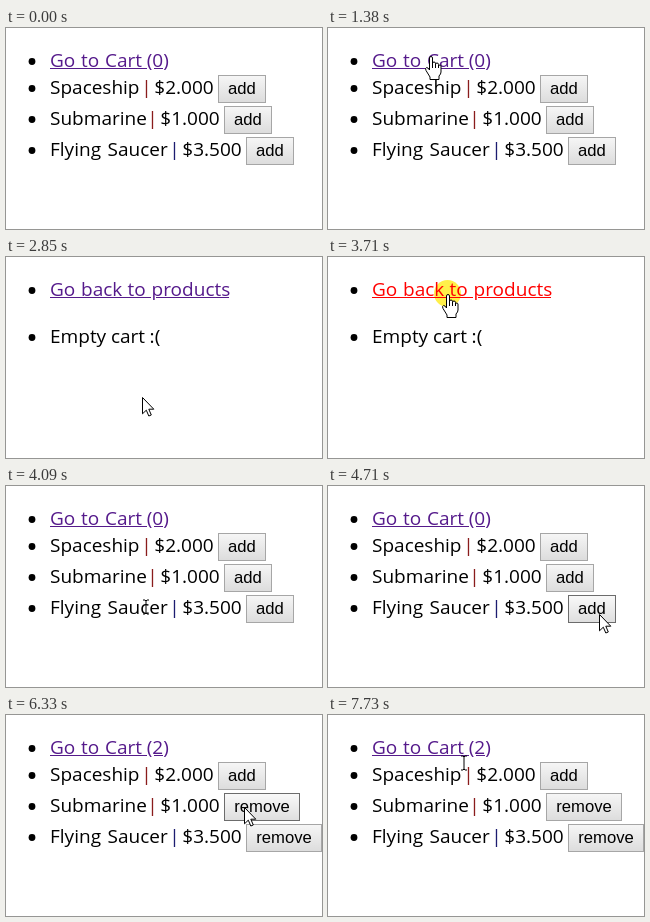
Write an HTML page that moves like this. It is 316 px wide and 201 px high and loops after 8 s.

```html
<!DOCTYPE html>
<html lang="en">
<head>
<meta charset="utf-8">
<title>Cart demo</title>
<style>
  html, body { margin: 0; width: 100%; height: 100%; overflow: hidden; background: #fff; }
  svg { display: block; width: 316px; height: 201px; }
  text { font: 19px "Open Sans", "Noto Sans", sans-serif; fill: #000; }
  .link text, .link rect { fill: #551a8b; }
  .link.active text, .link.active rect { fill: #f00; }
  .btn rect { fill: url(#face); stroke: #a6a6a6; }
  .btn text { font: 16.67px "Liberation Sans", Arial, sans-serif; text-anchor: middle; }
  .btn.hover rect { fill: url(#faceHover); stroke: #6c6c6c; }
  .btn.active rect { fill: url(#faceDown); }
  .bar { text-anchor: middle; }
  #halo { fill: #fff04a; mix-blend-mode: multiply; }
  .shape { fill: #fff; stroke: #000; stroke-linejoin: round; }
  .line { fill: none; stroke: #000; }
</style>
</head>
<body>
<svg viewBox="0 0 316 201">
  <defs>
    <linearGradient id="face" x2="0" y2="1"><stop stop-color="#f6f6f6"/><stop offset="1" stop-color="#dcdcdc"/></linearGradient>
    <linearGradient id="faceHover" x2="0" y2="1"><stop stop-color="#f9f9f9"/><stop offset="1" stop-color="#dedede"/></linearGradient>
    <linearGradient id="faceDown" x2="0" y2="1"><stop stop-color="#dcdcdc"/><stop offset="1" stop-color="#f3f3f3"/></linearGradient>
  </defs>
  <g id="shop"></g>
  <g id="cart"></g>
  <circle id="halo" r="13.5"/>
  <g id="cursor">
    <path id="arrow" class="shape" d="M.5 .5V16.8L4.3 13.2 6.8 19 9.3 18 6.8 12.2H11.8Z"/>
    <g id="hand">
      <path class="shape" d="M-1.5 14V2a1.5 1.5 0 0 1 3 0V8.5V7.5a1.5 1.5 0 0 1 3 0V9V8.5a1.5 1.5 0 0 1 3 0V10.5V10a1.3 1.3 0 0 1 2.5 0V16Q10 18 8 20V23.5H-1V21L-5 14.5Q-6.3 12 -4.3 11.5 -3 11.5 -1.5 14Z"/>
      <path class="line" d="M1.5 8V12M4.5 9V12M7.5 10V12"/>
    </g>
    <path id="beam" class="line" d="M-3 -7H-1L0 -6L1 -7H3M0 -6V6M-3 7H-1L0 6L1 7H3"/>
  </g>
</svg>
<script>
const LOOP = 8000;
const $ = id => document.getElementById(id);

function add(parent, tag, attrs, content = '') {
  const el = document.createElementNS('http://www.w3.org/2000/svg', tag);
  for (const k in attrs) el.setAttribute(k, attrs[k]);
  el.textContent = content;
  return parent.appendChild(el);
}

// words: [x, text, x, text, ...]
function line(parent, y, words) {
  const els = [];
  for (let i = 0; i < words.length; i += 2)
    els.push(add(parent, 'text', { x: words[i], y }, words[i + 1]));
  return els;
}

const bullet = (parent, cy) => add(parent, 'circle', { cx: 26, cy, r: 3.4 });

function link(parent, words, strokes) {
  bullet(parent, 33.5);
  const g = add(parent, 'g', { class: 'link' });
  const els = line(g, 39, words);
  for (const [a, b] of strokes) add(g, 'rect', { x: a, y: 40, width: b - a, height: 1 });
  return { g, els };
}

const shopLink = link($('shop'), [44, 'Go', 75, 'to', 98.9, 'Cart', 140.7, '(0)'], [[44, 141], [148, 157]]);
const cartLink = link($('cart'), [44, 'Go', 75, 'back', 121.6, 'to', 145.6, 'products'], [[44, 145], [150, 223]]);
bullet($('cart'), 80.5);
line($('cart'), 86, [44, 'Empty', 105, 'cart', 143.6, ':(']);

// words, price, button x, bar colour, time added
const rows = [
  [[44, 'Spaceship'], '$2.000', 212, '#8a1c1c', Infinity],
  [[44, 'Submarine'], '$1.000', 218, '#8a1c1c', 6330],
  [[44, 'Flying', 101.6, 'Saucer'], '$3.500', 240, '#1c1c70', 5330]
].map(([words, price, x, color, added], i) => {
  const shop = $('shop'), y = 47 + 31 * i, base = y + 19;
  bullet(shop, y + 13.5);
  line(shop, base, [...words, x - 63.7, price]);
  add(shop, 'text', { x: x - 71.5, y: base, class: 'bar', style: `fill:${color}` }, '|');
  const g = add(shop, 'g', { class: 'btn' });
  const box = add(g, 'rect', { x: x + .5, y: y + .5, height: 27 });
  const label = add(g, 'text', { y: base });
  return { x, y, added, g, box, label };
});

// start, end, steps, then a cubic path
const moves = [
  [450, 1240, 11, 299, 203, 150, 170, 5, 75, 98, 36],
  [1300, 1380, 2, 98, 36, 100, 33, 102, 30, 103, 28],
  [1930, 2390, 7, 103, 28, 110, 65, 128, 110, 136, 145],
  [2850, 3390, 8, 136, 145, 134, 110, 122, 70, 119.5, 37],
  [3850, 4480, 9, 119.5, 37, 125, 100, 160, 197, 203, 152],
  [4540, 4860, 5, 203, 152, 245, 150, 294, 117.5, 268, 122],
  [5490, 6020, 8, 268, 122, 262, 112, 246, 98, 238, 92],
  [6570, 6890, 5, 238, 92, 205, 110, 165, 140, 141, 159],
  [7350, 7730, 6, 141, 159, 128, 125, 108, 85, 135.5, 48]
];
const presses = [1780, 3710, 5260];

function pointer(t) {
  const move = moves.filter(m => t >= m[0]).pop();
  if (!move) return null;
  const [start, end, steps, ...p] = move;
  const gap = (end - start) / (steps - 1);
  const k = Math.min(1, (Math.floor((t - start) / gap + 1e-6) + 1) / steps);
  const u = k * k * (3 - 2 * k), v = 1 - u;
  const at = i => v * v * v * p[i] + 3 * v * v * u * p[i + 2] + 3 * v * u * u * p[i + 4] + u * u * u * p[i + 6];
  return { x: at(0), y: at(1) };
}

const show = (el, on) => el.style.display = on ? '' : 'none';
const inside = (p, x, y, w, h) => !!p && p.x >= x && p.x < x + w && p.y >= y && p.y < y + h;

function draw(t) {
  const p = pointer(t);
  const inCart = t >= 1850 && t < 3780;
  const down = presses.some(s => t >= s && t < s + 70);
  show($('shop'), !inCart);
  show($('cart'), inCart);

  const overLink = inside(p, 44, 20, inCart ? 179 : 119, 24);
  for (const l of [shopLink, cartLink]) l.g.classList.toggle('active', down && overLink);
  shopLink.els[3].textContent = `(${rows.filter(r => t >= r.added).length})`;

  let overText = inCart && inside(p, 44, 66, 110, 27);
  for (const r of rows) {
    const added = t >= r.added, w = added ? 76 : 48;
    const hover = !inCart && inside(p, r.x, r.y, w, 28);
    r.box.setAttribute('width', w - 1);
    r.label.setAttribute('x', r.x + w / 2);
    r.label.textContent = added ? 'remove' : 'add';
    r.g.classList.toggle('hover', hover);
    r.g.classList.toggle('active', hover && down);
    overText = overText || !inCart && inside(p, 44, r.y - 1, r.x - 50, 27);
  }

  show($('cursor'), p);
  show($('halo'), down);
  if (!p) return;
  $('cursor').setAttribute('transform', `translate(${Math.round(p.x)} ${Math.round(p.y)})`);
  $('halo').setAttribute('cx', p.x);
  $('halo').setAttribute('cy', p.y - .5);
  show($('hand'), overLink);
  show($('beam'), overText && !overLink);
  show($('arrow'), !overLink && !overText);
}

function tick() {
  draw(performance.now() % LOOP);
  requestAnimationFrame(tick);
}
tick();
</script>
</body>
</html>
```
